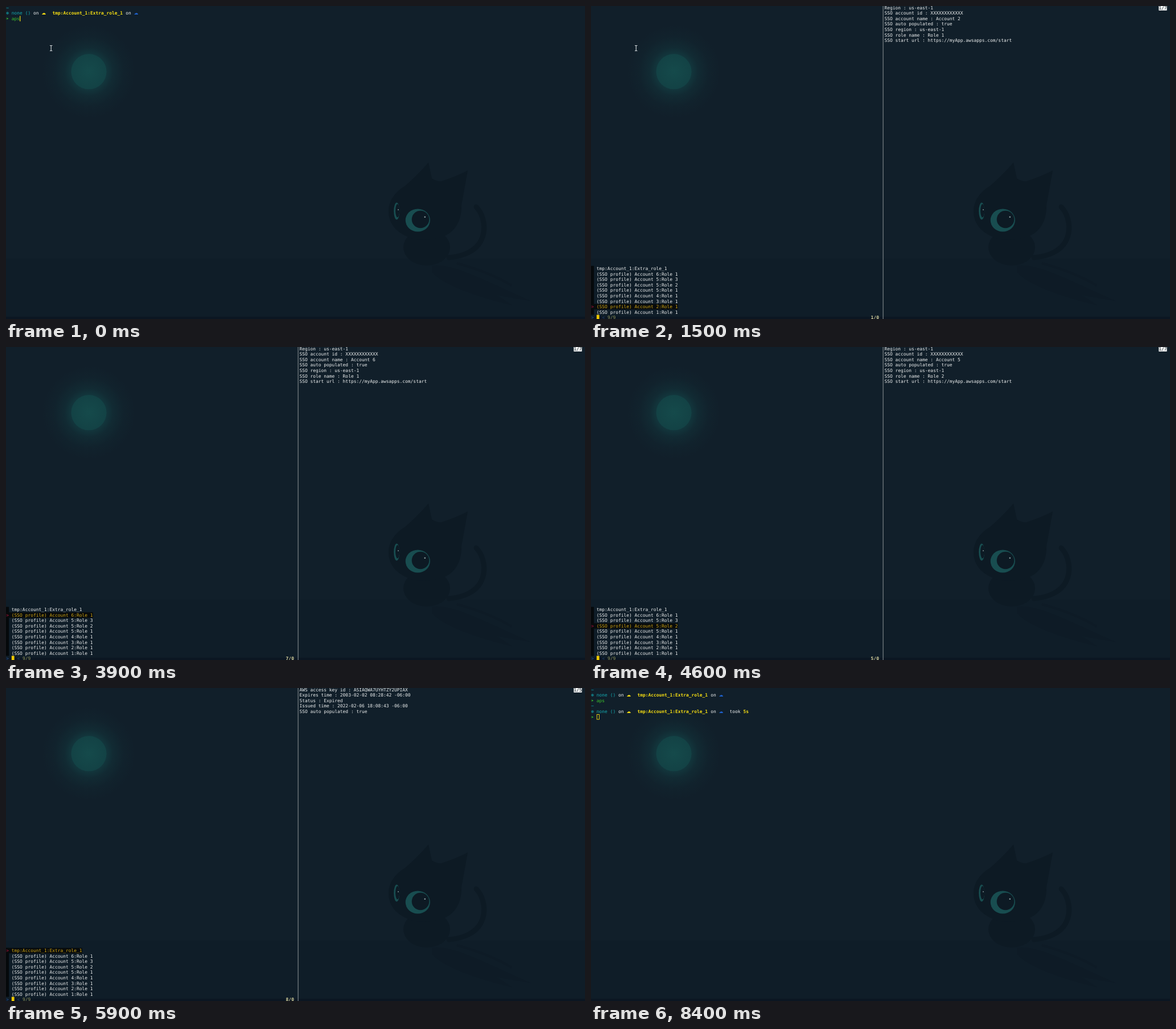
These frames come from a looping animation (1017 by 550 pixels, 9 s). An HTML page:

```html
<!DOCTYPE html>
<html lang="en">
<head>
<meta charset="utf-8">
<title>Terminal profile picker</title>
<style>
html, body { margin: 0; width: 100%; height: 100%; overflow: hidden; background: #111f2a; }
svg { display: block; width: 1017px; height: 550px; }
text {
  font: 7.923px "DejaVu Sans Mono", "DejaVu Sans", monospace;
  white-space: pre;
  text-rendering: geometricPrecision;
}
.bold { font-weight: bold; }
.wide { font-family: "DejaVu Sans", sans-serif; }
</style>
</head>
<body>
<svg viewBox="0 0 1017 550" xmlns="http://www.w3.org/2000/svg">
  <defs>
    <radialGradient id="glow" gradientUnits="userSpaceOnUse" cx="145.5" cy="115.3" r="82">
      <stop offset=".36" stop-color="#15625f" stop-opacity=".36"/>
      <stop offset=".52" stop-color="#15625f" stop-opacity=".17"/>
      <stop offset=".75" stop-color="#15625f" stop-opacity=".05"/>
      <stop offset="1" stop-color="#15625f" stop-opacity="0"/>
    </radialGradient>
    <radialGradient id="moon">
      <stop offset="0" stop-color="#154a4b"/>
      <stop offset="1" stop-color="#134245"/>
    </radialGradient>
  </defs>

  <rect width="1017" height="550" fill="#111f2a"/>
  <rect y="444" width="1017" height="106" fill="#0f1d28"/>
  <rect y="546" width="1017" height="4" fill="#0b1622"/>
  <circle cx="145.5" cy="115.3" r="82" fill="url(#glow)"/>
  <circle cx="145.5" cy="115.3" r="31" fill="url(#moon)"/>

  <g fill="#0e1b26">
    <path d="M748 456C790 452 850 488 924 519L862 508L890 526C840 515 770 492 748 468Z"/>
    <path d="M792 452Q850 468 888 491" fill="none" stroke="#0e1b26" stroke-width="4"/>
  </g>
  <g fill="#0d1a24">
    <path d="M826 353C841 369 843 394 835 411C826 430 804 440 778 442" fill="none" stroke="#0d1a24" stroke-width="9" stroke-linecap="round"/>
    <ellipse cx="739" cy="424" rx="41" ry="32"/>
    <path d="M742 275L748 303Q756 308 764 308Q790 300 811 289L800 350C801 382 784 401 764 406C744 412 718 413 704 405C684 396 672 381 672 361C672 342 684 326 701 316Q723 297 742 275Z"/>
  </g>
  <g fill="#184d50">
    <ellipse cx="686.2" cy="360.5" rx="5" ry="15"/>
    <ellipse cx="723.3" cy="376.5" rx="21.6" ry="20"/>
  </g>
  <g fill="#0d1a24">
    <ellipse cx="687.6" cy="359.7" rx="3.6" ry="11.6"/>
    <circle cx="728" cy="375" r="15.3"/>
  </g>
  <g fill="#8a9a9d">
    <circle cx="689" cy="358" r=".9"/>
    <circle cx="735.8" cy="370.8" r="1.3"/>
  </g>

  <g id="screen"></g>
  <path id="pointer" d="M77 69.5H78.4L79.2 70.3L80 69.5H81.4M79.2 70V78.5M77 78.8H78.4L79.2 78L80 78.8H81.4" fill="none" stroke="#d9dfe1" stroke-width="1.1"/>
</svg>

<script>
const LOOP = 9000, CELL_W = 4.77, CELL_H = 9.55;
const WHITE = '#eef0f0', YELLOW = '#f8df12', CYAN = '#14a9b0', GREEN = '#3cc22e',
      BLUE = '#1f62cf', GOLD = '#cfa514';
const screenLayer = document.getElementById('screen');
const pointer = document.getElementById('pointer');

const roles = [[1, 1], [2, 1], [3, 1], [4, 1], [5, 1], [5, 2], [5, 3], [6, 1]];
const profiles = [
  ...roles.map(([account, role]) => `(SSO profile) Account ${account}:Role ${role}`),
  'tmp:Account_1:Extra_role_1'
];

// Each step: start time, then either a shell cursor or a picked row with its preview row.
const steps = [
  [0, { cursor: 'bar' }],
  [400, { cursor: '' }],
  [900, { cursor: 'bar' }],
  [1000, { pick: 0, preview: -1 }],
  ...[[1100, 0], [1500, 1], [1700, 2], [1900, 3], [2100, 4], [2300, 5], [2800, 8], [3900, 7],
      [4500, 6], [4600, 5], [4700, 4], [4800, 3], [5000, 1], [5700, 0]]
    .map(([at, pick]) => [at, { pick, preview: pick }]),
  [5800, { pick: 8, preview: 0 }],
  [5900, { pick: 8, preview: 8 }],
  [7000, { done: true, cursor: 'bar' }],
  [7600, { done: true, cursor: '' }],
  [8100, { done: true, cursor: 'bar' }],
  [8400, { done: true, cursor: 'box' }]
];

const colX = col => 0.3 + col * CELL_W;
const rowY = row => -1.7 + row * CELL_H;
const escapeText = s => s.replace(/&/g, '&amp;').replace(/</g, '&lt;').replace(/>/g, '&gt;');

function put(row, col, string, fill = WHITE, style = '') {
  return `<text x="${colX(col)}" y="${rowY(row) + 7.5}" fill="${fill}" class="${style}">${escapeText(string)}</text>`;
}

function block(row, col, cols, fill, rows = 1) {
  return `<rect x="${colX(col)}" y="${rowY(row)}" width="${cols * CELL_W}" height="${rows * CELL_H}" fill="${fill}"/>`;
}

function prompt(row) {
  return put(row, 0, '~', CYAN)
    + put(row + 1, 0, '⊛', CYAN) + put(row + 1, 2, 'none ()', CYAN) + put(row + 1, 10, 'on')
    + put(row + 1, 13, '☁', YELLOW, 'wide')
    + put(row + 1, 17, 'tmp:Account_1:Extra_role_1', YELLOW, 'bold')
    + put(row + 1, 44, 'on') + put(row + 1, 47, '☁', BLUE, 'wide')
    + put(row + 2, 0, '➤', GREEN);
}

function cursorAt(row, col, kind) {
  const x = colX(col), y = rowY(row);
  if (kind === 'bar') return `<rect x="${x}" y="${y}" width="1.2" height="${CELL_H}" fill="${YELLOW}"/>`;
  if (kind === 'box') return `<rect x="${x + .5}" y="${y + .5}" width="${CELL_W - .6}" height="${CELL_H - 1}" fill="none" stroke="${YELLOW}" stroke-width=".9"/>`;
  return '';
}

function shell({ done, cursor }) {
  let out = prompt(0) + put(2, 2, 'aps', GREEN);
  if (done) out += prompt(3) + put(4, 51, 'took') + put(4, 56, '5s', YELLOW, 'bold');
  return out + (done ? cursorAt(5, 2, cursor) : cursorAt(2, 5, cursor));
}

function details(index) {
  if (index === 8) return [
    'AWS access key id : ASIAQWA7UYHTZY2UPIAX',
    'Expires time : 2003-02-02 08:28:42 -06:00',
    'Status : Expired',
    'Issued time : 2022-02-06 18:08:43 -06:00',
    'SSO auto populated : true'
  ];
  const [account, role] = roles[index];
  return [
    'Region : us-east-1',
    'SSO account id : XXXXXXXXXXXX',
    `SSO account name : Account ${account}`,
    'SSO auto populated : true',
    'SSO region : us-east-1',
    `SSO role name : Role ${role}`,
    'SSO start url : https://myApp.awsapps.com/start'
  ];
}

function picker({ pick, preview }) {
  let out = `<rect x="512.6" width="1" height="550" fill="#92989b"/>`
    + `<rect y="${rowY(48)}" width="5.1" height="${9 * CELL_H}" fill="#05090b"/>`;
  profiles.forEach((name, i) => {
    const row = 56 - i, chosen = i === pick;
    if (chosen) out += block(row, 0, name.length + 2, '#080b0c') + put(row, 0, '>', '#b5123e');
    out += put(row, 2, name, chosen ? GOLD : WHITE);
  });
  out += put(57, 0, '>', '#2c5796') + block(57, 2, 1, '#edc800')
    + put(57, 4, '<', '#24446f') + put(57, 6, '9/9', '#8f9358')
    + put(57, 103, pick + '/0', '#d9d5a0', 'bold');
  if (preview >= 0) {
    const lines = details(preview);
    lines.forEach((line, row) => out += put(row, 108, line));
    out += block(0, 209, 3, '#f4f5f5') + put(0, 209, '1/' + lines.length, '#15212a');
  }
  return out;
}

let shown;
function draw(time) {
  const [, state] = steps.findLast(([at]) => at <= time);
  pointer.style.display = time < 3000 ? '' : 'none';
  if (state === shown) return;
  shown = state;
  screenLayer.innerHTML = 'pick' in state ? picker(state) : shell(state);
}

const begin = performance.now();
function tick() {
  draw((performance.now() - begin) % LOOP);
  requestAnimationFrame(tick);
}
tick();
</script>
</body>
</html>
```
